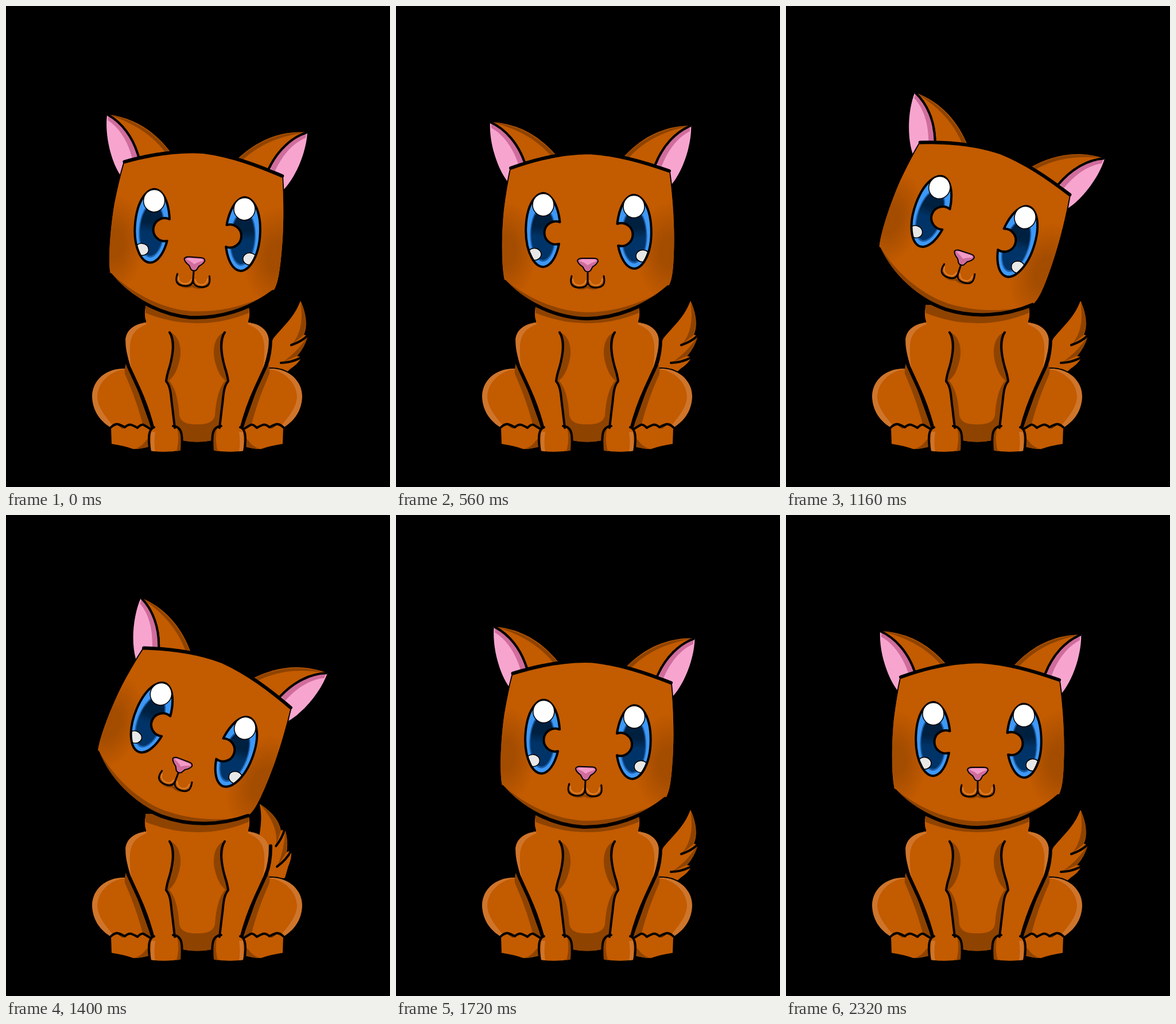
These frames come from a looping animation (669x837 px, 2360 ms). An HTML page:

```html
<!DOCTYPE html>
<html lang="en">
<head>
<meta charset="utf-8">
<title>Sitting cat</title>
<style>
  html, body { margin: 0; width: 100%; height: 100%; overflow: hidden; background: #000; }
  svg { display: block; width: 100%; height: 100%; }
  .fur { fill: #c35b00; }
  .shade { fill: #8f4300; }
  .glow { fill: #cf752b; }
  .ink { stroke: #000; stroke-width: 4; stroke-linecap: round; stroke-linejoin: round; paint-order: stroke; }
  .thick { stroke-width: 6; }
  .thin { stroke-width: 3; }
  .line { fill: none; }
</style>
</head>
<body>
<svg viewBox="0 0 669 837">
  <defs>
    <radialGradient id="cheek">
      <stop offset=".3" stop-color="#8a4000" stop-opacity=".55"/>
      <stop offset="1" stop-color="#8a4000" stop-opacity="0"/>
    </radialGradient>
    <linearGradient id="pupil" x2="0" y2="1">
      <stop offset=".35" stop-color="#002040"/>
      <stop offset=".55" stop-color="#003468"/>
    </linearGradient>
    <path id="skull" d="M200 284C245 268 290 257 337 257C385 260 430 273 476 289C482 330 486 385 484 430C483 460 481 478 474 489C435 523 385 543 333 544C280 543 225 518 190 480C183 455 184 395 188 355Q193 315 200 284Z"/>
    <path id="eyeShape" d="M285.5 376A20 20 0 1 0 284 414A30 64 0 1 1 285.5 376Z"/>
    <clipPath id="skullClip"><use href="#skull"/></clipPath>
    <clipPath id="eyeClip"><use href="#eyeShape"/></clipPath>

    <g id="limbs">
      <path class="glow ink" d="M216 632C180 626 150 648 150 680C151 706 165 723 183 734L194 728L203 734L215 728L228 734L238 728L254 738Z"/>
      <path class="fur" d="M216 632C190 630 160 650 159 680C160 700 175 716 186 730L194 728L203 734L215 728L228 734L238 728L254 738Z"/>
      <path class="shade" d="M211 616Q206 628 207 640C218 665 228 690 238 727L254 738Z"/>
      <path class="fur" d="M183 734L194 729L203 735L215 729L228 735L238 729L252 737V766Q236 771 222 771Q205 765 184 762Z"/>
      <path class="shade" d="M222 771Q236 768 244 756L250 750V766Q236 771 222 771Z"/>
      <path class="ink line" d="M183 733Q190 726 196 728T207 733Q214 727 219 729T229 734Q236 727 240 729L250 735"/>
      <path class="fur" d="M243 551C215 555 204 572 209 596Q215 628 230 662L256 735L296 738L288 675L279 653L290 600L284 560Z"/>
      <path class="glow" d="M243 551C215 555 204 572 209 596Q213 616 219 634Q215 610 216 592C217 572 226 561 245 554Z"/>
      <path class="ink line thick" d="M205 576Q205 606 213 626L231 665Q247 700 256 736"/>
      <path class="fur" d="M256 734Q280 726 298 733Q308 738 305 773Q280 778 252 774Q247 748 256 734Z"/>
      <path class="glow" d="M253 741H260Q257 760 260 775L252 774Z"/>
      <path class="shade" d="M298 733Q308 738 305 773L297 775Q303 752 298 733Z"/>
      <path class="ink line" d="M258 733C247 736 248 757 251 775M291 731C307 732 308 746 306 775M285 568C295 582 290 610 285 628Q280 643 279 653C288 663 287 680 290 700L294 734"/>
    </g>

    <g id="ear" class="ink">
      <path class="fur" d="M164 202C215 204 252 228 281 262L224 276Z"/>
      <path class="shade" stroke="none" d="M168 203C215 206 252 230 279 261L271 262C248 235 215 214 168 203Z"/>
      <path fill="#f7a5cf" d="M164 202C162 235 175 280 194 305L200 284L224 272C212 238 190 214 164 202Z"/>
      <path fill="#d06d9d" stroke="none" d="M166 205C190 216 211 240 222 271L213 275C204 248 188 224 166 212Z"/>
      <path class="line" d="M224 272C212 238 190 214 166 203"/>
    </g>

    <g id="eye">
      <use href="#eyeShape" fill="#3d98f7"/>
      <g clip-path="url(#eyeClip)">
        <ellipse cx="256" cy="397" rx="22.500" ry="48" fill="#1b5ea8"/>
        <ellipse cx="256" cy="397" rx="20.500" ry="45" fill="url(#pupil)"/>
        <ellipse cx="241" cy="432" rx="12" ry="10.500" fill="#e8e8e8" stroke="#000" stroke-width="1.5"/>
      </g>
      <use href="#eyeShape" class="ink line"/>
      <ellipse cx="256.500" cy="346" rx="18.500" ry="19.500" fill="#fff" stroke="#000" stroke-width="1.5"/>
    </g>
  </defs>

  <g id="tail">
    <path class="fur ink" d="M513 513C502 542 484 556 466 578Q453 600 458 640L480 645L496 631Q509 623 515 611L507 609Q520 595 526 574L519 572C527 553 521 530 513 513Z"/>
    <path class="shade" d="M513 515C521 532 526 553 518 573L498 589C514 570 518 545 513 515ZM526 574Q519 596 507 609L480 621Q508 602 526 574Z"/>
    <path class="ink line" d="M526 573Q515 584 497 590M515 611Q500 620 479 621"/>
  </g>

  <path class="fur" d="M243 520H423L426 551L400 740L358 756Q333 761 308 756L266 740L240 551Z"/>
  <path class="shade" d="M243 520H423V534Q380 552 333 552Q286 552 243 534Z"/>
  <path class="shade" d="M286 568C303 574 308 600 301 622Q296 642 284 652Q299 668 302 712C305 726 318 728 333 728C348 728 361 726 364 712Q367 668 382 652Q370 642 365 622C358 600 363 574 380 568L390 650L372 742L358 756Q333 761 308 756L294 742L276 650Z"/>
  <path class="ink line" d="M241 522Q238 538 242 549M425 522Q428 538 424 549"/>
  <use href="#limbs"/>
  <use href="#limbs" transform="matrix(-1 0 0 1 666 0)"/>

  <g id="head">
    <use href="#ear"/>
    <use href="#ear" transform="rotate(2 339 240) matrix(-1 0 0 1 677 0)"/>
    <use href="#skull" class="shade ink"/>
    <g clip-path="url(#skullClip)">
      <path class="fur" d="M180 250H490V478C440 516 385 532 333 533C280 532 225 508 180 468Z"/>
      <ellipse cx="192" cy="425" rx="54" ry="85" fill="url(#cheek)"/>
      <ellipse cx="478" cy="428" rx="60" ry="88" fill="url(#cheek)"/>
    </g>
    <path class="ink line thick" d="M200 282C245 266 290 255 337 255C385 258 430 271 476 287M474 489C435 523 385 543 333 544C280 543 225 518 190 480"/>
    <use href="#eye"/>
    <use href="#eye" transform="matrix(-1 0 0 1 671 3)"/>
    <path class="line" stroke="#8f4300" stroke-width="4" d="M307 484Q318 496 333 489Q349 496 360 484"/>
    <path class="line" stroke="#dd8030" stroke-width="2" d="M308 474Q308 486 320 486Q329 486 331 477M337 477Q340 486 348 486Q359 486 359 474"/>
    <path class="ink line thin" d="M334 463V478C334 486 329 490 320 490C307 490 302 484 306 470M334 478C334 486 340 490 348 490C361 490 365 484 362 470"/>
    <path class="ink" fill="#d06d9d" d="M317 443Q319 440 324 440H345Q351 440 351 444Q349 449 342 453L338 460Q334 463 330 460L326 453Q318 448 317 443Z"/>
    <path fill="#f39bc8" d="M319 443Q322 441 326 441H344Q349 441 349 444L339 448L334 451L328 447Z"/>
  </g>
</svg>
<script>
  const FRAME = 40, FRAMES = 59, WAG = 14;
  // [frame, degrees]
  const headKeys = [[0, 4.1], [7, -12], [14, 0], [16, 0], [31, 21], [35, 21], [44, 0], [58, 0]];
  const tailKeys = [[0, 0], [2, 0], [7, -33], [11, 53], [14, 0]];
  const head = document.getElementById('head');
  const tail = document.getElementById('tail');

  function angleAt(keys, frame) {
    const i = Math.max(1, keys.findIndex(([at]) => at >= frame));
    const [[a, from], [b, to]] = [keys[i - 1], keys[i]];
    return from + (to - from) * (frame - a) / (b - a);
  }

  function draw(now) {
    const frame = Math.floor(now / FRAME) % FRAMES;
    head.setAttribute('transform', `rotate(${angleAt(headKeys, frame)} 356 365)`);
    tail.setAttribute('transform', `rotate(${angleAt(tailKeys, frame % WAG)} 460 628)`);
  }

  const start = performance.now();
  function tick() {
    draw(performance.now() - start);
    requestAnimationFrame(tick);
  }
  tick();
</script>
</body>
</html>
```
